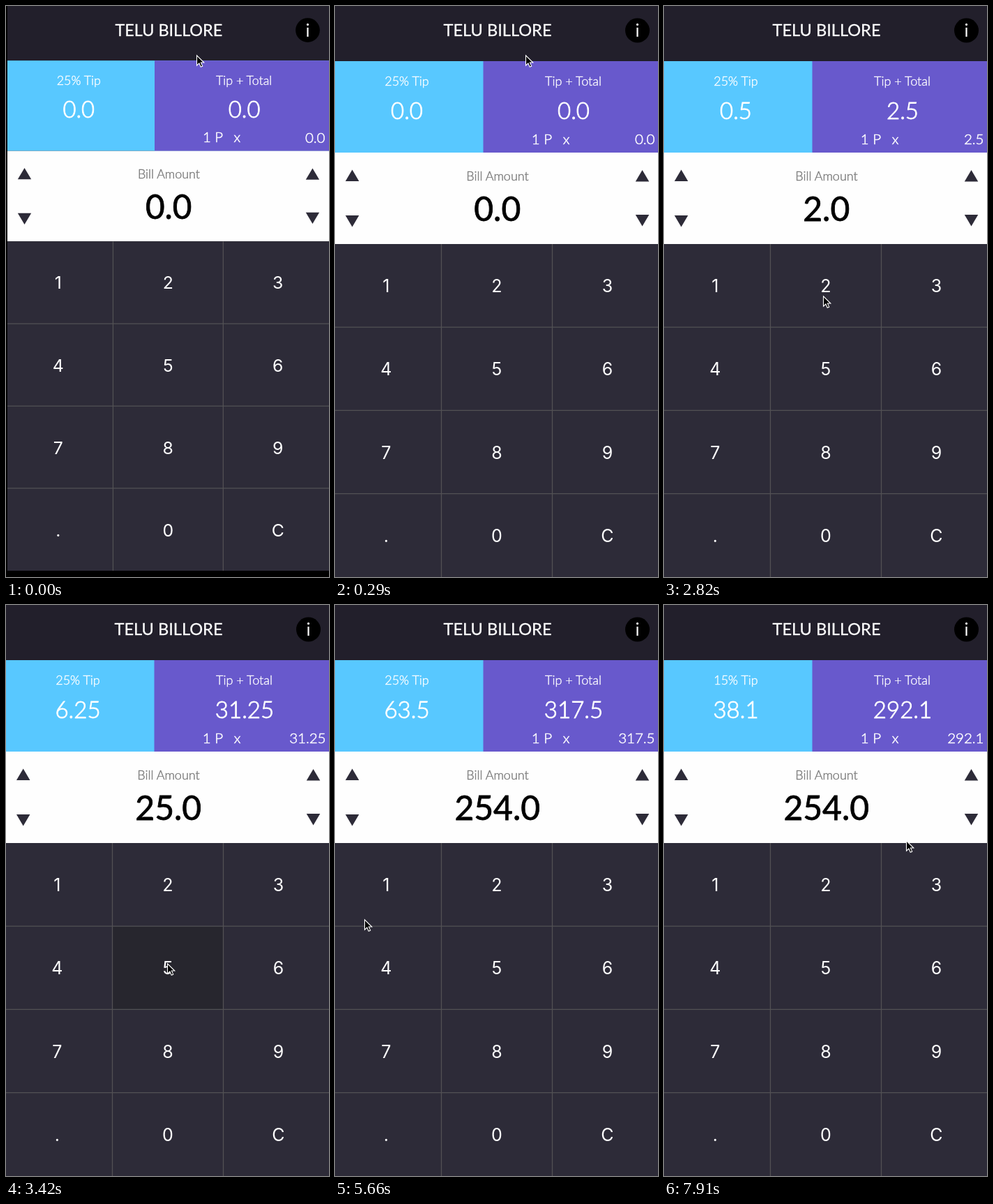
An HTML page that plays this animation: 463x818 px, repeating every 8000 ms.

```html
<!DOCTYPE html>
<html lang="en">
<head>
<meta charset="utf-8">
<title>Tip calculator</title>
<style>
  html, body { margin: 0; width: 100%; height: 100%; overflow: hidden; background: #000; }
  svg { display: block; width: 463px; height: 818px; }
  text {
    font-family: Lato, "Open Sans", sans-serif; text-anchor: middle;
    color: #fff; fill: currentColor; stroke: currentColor; stroke-width: 0;
  }
  .title { font-size: 23.6px; stroke-width: .3px; }
  .label { font-size: 18px; font-weight: 300; stroke-width: .4px; }
  .value { font-size: 33px; font-weight: 300; stroke-width: .9px; }
  .split { font-size: 20.5px; font-weight: 300; stroke-width: .55px; }
  .bill { font-size: 48px; color: #000; stroke-width: .8px; }
  .key { font: 25px Inter, Roboto, sans-serif; }
  #app { animation: settle 8s infinite; }
  @keyframes settle {
    0% { transform: translate(2px, 0) scale(.993, .989); animation-timing-function: steps(2); }
    3.5%, 100% { transform: translate(0, 0) scale(1, 1); }
  }
</style>
</head>
<body>
<svg viewBox="0 0 463 818">
  <defs><path id="up" d="M-9.75 8H9.75L0-8.5Z" fill="#2d2b38"/></defs>
  <g id="app">
    <rect width="470" height="79" fill="#221f2b"/>
    <rect y="79" width="470" height="131" fill="#58c8ff"/>
    <rect x="212.5" y="79" width="258" height="131" fill="#6859cc"/>
    <rect y="210" width="470" height="131" fill="#fefefe"/>
    <rect y="341" width="470" height="477" fill="#2d2b38"/>
    <rect id="pressed" x="153" y="461" width="158" height="118" fill="#27262e"/>
    <path d="M152.5 341V818M311.5 341V818M0 460.2H470M0 579.4H470M0 698.6H470" stroke="#525154" stroke-width="1.3"/>

    <text class="title" x="233" y="43">TELU BILLORE</text>
    <circle cx="433.5" cy="35" r="17.5"/>
    <text x="433.5" y="44" font-size="25">i</text>

    <text id="rate" class="label" x="103" y="114"></text>
    <text id="tip" class="value" x="103" y="162"></text>
    <text class="label" x="341.5" y="114">Tip + Total</text>
    <text id="total" class="value" x="342" y="162"></text>
    <text class="split" x="296.5" y="197.5">1 P</text>
    <text class="split" x="331.5" y="197.5">x</text>
    <text id="share" class="split" x="458.5" y="198" style="text-anchor:end"></text>

    <text class="label" x="233" y="250" style="color:#777">Bill Amount</text>
    <text id="bill" class="bill" x="232.8" y="308"></text>
    <use href="#up" x="24.7" y="243"/>
    <use href="#up" x="440.5" y="243.6"/>
    <use href="#up" transform="translate(24.7 308) scale(1 -1)"/>
    <use href="#up" transform="translate(440.5 307) scale(1 -1)"/>
    <g id="keys"></g>
  </g>
  <path id="cursor" d="M.5.8V15.2L3.9 12 6.2 17.2 8.7 16.1 6.4 11H10.8Z" stroke="#fff" stroke-width="1.1"/>
</svg>
<script>
  const LOOP = 8000, STEP = 150;
  const $ = id => document.getElementById(id);

  // The pointer glides from stop to stop; "bend" is the control point of a curved path
  const home = [273, 70];
  const glides = [
    { start: 880, steps: 6, to: [228, 415], bend: [96, 495] },
    { start: 2970, steps: 2, to: [231, 513] },
    { start: 3570, steps: 2, to: [62, 502] },
    { start: 4310, steps: 3, to: [60, 593] },
    { start: 5360, steps: 6, to: [24, 306] },
    { start: 7460, steps: 4, to: [347, 337] }
  ];

  // Digits extend the bill, "-" lowers the tip rate
  const taps = [[2820, "2"], [3420, "5"], [4020, "4"], [6410, "-"], [6560, "-"]];

  const ease = p => p * p * (3 - 2 * p);
  const money = n => Number.isInteger(n) ? n.toFixed(1) : String(+n.toFixed(2));

  function pointerAt(t) {
    let from = home;
    for (const { start, steps, to, bend } of glides) {
      if (t < start) break;
      const done = Math.floor((t - start) / STEP) + 1;
      const p = ease(Math.min(1, done / steps));
      from = from.map((a, i) => {
        const mid = bend ? bend[i] : (a + to[i]) / 2;
        return (1 - p) ** 2 * a + 2 * p * (1 - p) * mid + p * p * to[i];
      });
    }
    return from;
  }

  function entryAt(t) {
    let bill = 0, percent = 25;
    for (const [time, key] of taps) {
      if (t < time) break;
      if (key === "-") percent -= 5;
      else bill = bill * 10 + Number(key);
    }
    return { bill, percent };
  }

  [..."123456789.0C"].forEach((label, i) => {
    const key = document.createElementNS("http://www.w3.org/2000/svg", "text");
    key.setAttribute("class", "key");
    key.setAttribute("x", 73.3 + (i % 3) * 158.6);
    key.setAttribute("y", 410 + Math.floor(i / 3) * 119.4);
    key.textContent = label;
    $("keys").append(key);
  });

  function draw(t) {
    const { bill, percent } = entryAt(t);
    const tip = bill * percent / 100;
    $("cursor").setAttribute("transform", `translate(${pointerAt(t).map(Math.round)})`);
    $("pressed").setAttribute("visibility", t >= 3420 && t < 3570 ? "visible" : "hidden");
    $("rate").textContent = `${percent}% Tip`;
    $("tip").textContent = money(tip);
    $("total").textContent = $("share").textContent = money(bill + tip);
    $("bill").textContent = money(bill);
  }

  const settle = $("app").getAnimations()[0];
  const start = performance.now();
  function tick() {
    const t = (performance.now() - start) % LOOP;
    settle.currentTime = t;
    draw(t);
    requestAnimationFrame(tick);
  }
  tick();
</script>
</body>
</html>
```
